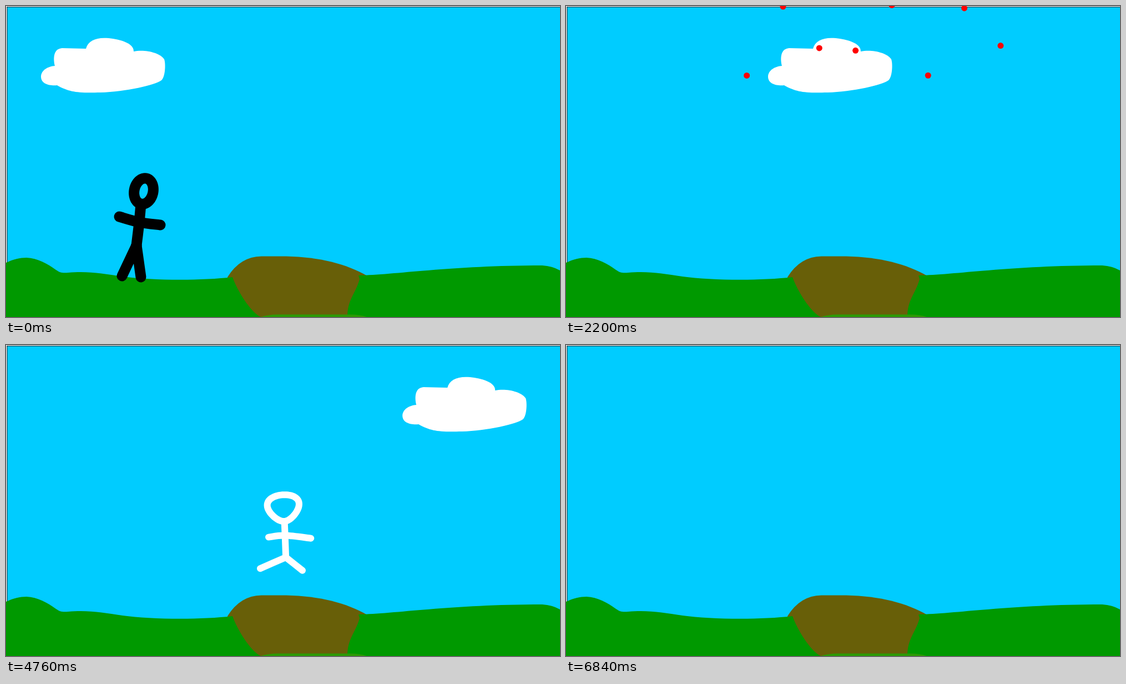
These frames come from a looping animation (998 by 561 pixels, 7120 ms). An HTML page with a canvas:

```html
<!DOCTYPE html>
<html lang="en">
<head>
<meta charset="utf-8">
<title>The hole</title>
<style>
html, body { margin: 0; width: 100%; height: 100%; overflow: hidden; background: #fff; }
canvas { display: block; }
</style>
</head>
<body>
<canvas id="stage" width="998" height="561"></canvas>
<script>
const LOOP = 7120, STEP = 40;
const ctx = document.getElementById('stage').getContext('2d');

const cloud = new Path2D('M92 143C78 144 63 141 63 127C64 115 76 109 88 108C85 95 85 77 101 76L144 77C148 62 163 56 185 58C205 60 231 67 230 82C250 78 277 84 285 96C288 104 287 128 280 134C270 142 215 155 170 156C130 157 115 156 92 143Z');
const dirt = new Path2D('M399 489Q422 452 460 451.5H505C565 453 613 465 651 487L645 561H405Z');
const leftHill = new Path2D('M0 463C13 457 25 454 37 454C57 455 75 465 90 476C97 481 102 482 112 481C150 478 175 483 210 488C260 495 350 496 408 489C416 512 440 552 459 561H0Z');
const rightHill = new Path2D('M635 486C700 485 800 468 966 468Q984 469 998 477V561H615C615 530 629 520 637 493Z');
const grass = new Path2D('M459 561Q472 556.5 490 556.5H620Q638 556.5 650 561Z');

// A pose is nine key points; the cheek gives the width of the head.
const [CROWN, NECK, CHEEK, CHEST, HIP, HAND_L, HAND_R, FOOT_L, FOOT_R] = Array(9).keys();
const stand = [[253, 311], [243, 357], [265, 334], [240, 390], [235, 432], [204, 380], [278, 395], [209, 487], [243, 489]];
const tumble = [[523, 420], [552, 430], [543, 407], [568, 434], [597, 453], [551, 466], [590, 416], [584, 496], [622, 485]];
const rise = [[517, 441], [514, 481], [533, 461], [513, 504], [516, 547], [488, 507], [556, 507], [493, 561], [533, 562]];
const soar = [[480, 69], [490, 124], [522, 96], [493, 152], [493, 188], [459, 155], [543, 159], [425, 214], [535, 220]];

const lerp = ([x, y], [u, v], k) => [x + (u - x) * k, y + (v - y) * k];
const mix = (a, b, k) => a.map((p, i) => lerp(p, b[i], k));
const shift = (pose, dx, dy) => pose.map(([x, y]) => [x + dx, y + dy]);
const large = soar.map(([x, y]) => [492 + (x - 492) * 1.2, 188 - (226 - y) * 1.14]);

const manKeys = [
  [0, stand],
  [640, shift(stand, 495, -4)],
  [720, shift(stand, 462, -6)],
  [920, tumble],
  [1080, shift(tumble, -20, 55)],
  [1240, shift(tumble, -40, 175)]
];
const ghostKeys = [
  [2640, shift(rise, 0, 129)],
  [3920, rise],
  [4320, shift(mix(rise, soar, 0.25), 0, 33)],
  [5560, soar],
  [5760, large],
  [6520, shift(large, 0, -192)]
];

function poseAt(keys, t) {
  const n = keys.findIndex(([time]) => time > t);
  if (n < 1) return null;
  const [t0, a] = keys[n - 1], [t1, b] = keys[n];
  return mix(a, b, (t - t0) / (t1 - t0));
}

// Smooth line through every point.
function curve(...pts) {
  const at = i => pts[Math.max(0, Math.min(pts.length - 1, i))];
  ctx.beginPath();
  ctx.moveTo(...pts[0]);
  for (let i = 0; i < pts.length - 1; i++) {
    const [a, b, c, d] = [-1, 0, 1, 2].map(k => at(i + k));
    ctx.bezierCurveTo(b[0] + (c[0] - a[0]) / 6, b[1] + (c[1] - a[1]) / 6,
      c[0] - (d[0] - b[0]) / 6, c[1] - (d[1] - b[1]) / 6, c[0], c[1]);
  }
  ctx.stroke();
}

// Egg between crown and neck; taper narrows it toward the neck.
function head(crown, neck, cheek, taper) {
  const [cx, cy] = lerp(crown, neck, 0.5);
  const half = Math.hypot(cheek[0] - cx, cheek[1] - cy);
  const length = Math.hypot(neck[0] - crown[0], neck[1] - crown[1]);
  const ux = (neck[0] - crown[0]) / length, uy = (neck[1] - crown[1]) / length;
  ctx.beginPath();
  for (let a = 0; a < Math.PI * 2; a += 0.1) {
    const along = -Math.cos(a) * length / 2;
    const across = half * Math.sin(a) * (1 + taper * Math.cos(a));
    ctx.lineTo(cx + ux * along + uy * across, cy + uy * along - ux * across);
  }
  ctx.closePath();
  ctx.stroke();
}

function figure(p, color, width, taper) {
  if (!p) return;
  ctx.strokeStyle = color;
  ctx.lineWidth = width;
  ctx.lineCap = ctx.lineJoin = 'round';
  head(p[CROWN], p[NECK], p[CHEEK], taper);
  curve(p[NECK], p[CHEST], p[HIP]);
  curve(p[HAND_L], p[CHEST], p[HAND_R]);
  curve(p[FOOT_L], p[HIP]);
  curve(p[HIP], p[FOOT_R]);
}

function man(t) {
  const pose = poseAt(manKeys, t);
  if (pose && t < 640) {
    const swing = 18 * Math.sin(t / 640 * Math.PI * 6);
    pose[FOOT_L][0] += swing;
    pose[FOOT_R][0] -= swing;
  }
  return pose;
}

function splash(t) {
  if (t < 1700 || t > 2500) return;
  const age = t - 1760;
  ctx.fillStyle = '#f00';
  for (let i = 0; i < 8; i++) {
    const x = 466 + 19.1 * i, lift = Math.cos(2.5 * i);
    ctx.beginPath();
    ctx.arc(x + (x - 524) * 0.0055 * age, 558 + 3 * lift - (1.14 - 0.15 * lift) * age, 5.5, 0, Math.PI * 2);
    ctx.fill();
  }
}

function fill(path, color) {
  ctx.fillStyle = color;
  ctx.fill(path);
}

function draw(t) {
  ctx.fillStyle = '#fff';
  ctx.fillRect(0, 0, 998, 561);
  ctx.fillStyle = '#00ccff';
  ctx.fillRect(2, 2, 996, 559);
  ctx.fillStyle = '#0a2a33';
  ctx.fillRect(1.4, 1.2, 997, 1.1);
  ctx.fillRect(1.4, 1.2, 1.1, 560);

  ctx.save();
  ctx.translate(t * 0.1368, 0);
  fill(cloud, '#fff');
  ctx.restore();

  fill(dirt, '#685f08');
  fill(leftHill, '#009900');
  fill(rightHill, '#009900');
  fill(grass, '#2c9a05');

  figure(man(t), '#000', 19, 0);
  splash(t);
  figure(poseAt(ghostKeys, t), '#fff', 12, 0.3);
}

function tick() {
  const t = performance.now() % LOOP;
  draw(Math.min(6840, Math.floor(t / STEP) * STEP));
  requestAnimationFrame(tick);
}
tick();
</script>
</body>
</html>
```
